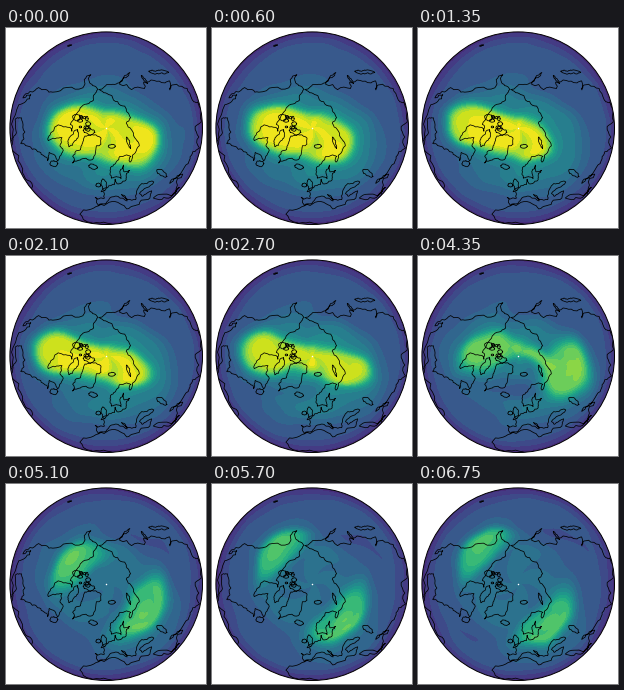
Recreate the animation shown at these times as a matplotlib script. Size 200 by 200 pixels, loop 6.9 s.

```python
import numpy as np
import matplotlib.pyplot as plt
from matplotlib.animation import FuncAnimation
from matplotlib.patches import Circle

FRAMES, STEP = 46, 150
SIZE, MID, RADIUS = 200, 100.2, 96.3
LEVELS = np.linspace(0, 1, 21)

fig = plt.figure(figsize=(2, 2), dpi=100, facecolor="white")
ax = fig.add_axes([0, 0, 1, 1])
ax.set(xlim=(0, SIZE), ylim=(SIZE, 0))
ax.axis("off")
globe = Circle((MID, MID), RADIUS, fill=False, ec="black", lw=0.7, zorder=5)
ax.add_patch(globe)
ax.plot(99.8, 99.8, "o", color="white", ms=1.1, mew=0, zorder=4)

rng = np.random.default_rng(12)


# ---- coastlines ----

def project(lon, lat):
    """Orthographic view from above the north pole."""
    r = RADIUS * np.cos(np.radians(lat))
    return MID + r * np.sin(np.radians(lon)), MID + r * np.cos(np.radians(lon))


def outline(x, y, rough=0.12):
    """Draw a line roughened by midpoint displacement."""
    p = np.column_stack([x, y])
    for _ in range(3):
        step = np.diff(p, axis=0)
        side = np.column_stack([-step[:, 1], step[:, 0]])
        mids = p[:-1] + step / 2 + side * rng.normal(0, rough, (len(step), 1))
        p = np.insert(p, np.arange(1, len(p)), mids, axis=0)
    ax.plot(*p.T, color="black", lw=0.55, zorder=3, clip_path=globe)


def coast(*points):
    outline(*project(*np.array(points, float).T))


def island(lon, lat, a, b, tilt=0):
    x, y = project(lon, lat)
    s, w = np.linspace(0, 2 * np.pi, 9), np.radians(tilt)
    u, v = a * np.cos(s), b * np.sin(s)
    outline(x + u * np.cos(w) - v * np.sin(w), y + u * np.sin(w) + v * np.cos(w))


# Arctic Eurasia with the Baltic
coast((8.5, 54), (10, 57.5), (11, 54), (20, 54.5), (24, 59), (29, 60), (22, 61),
      (25, 65), (17.5, 62), (16.5, 57), (11, 59), (6, 58.5), (5, 62), (14, 67.5),
      (25.5, 71), (41, 67), (35, 64.5), (44, 67), (67, 69), (72, 72), (104, 77.6),
      (113, 74), (140, 72.6), (170, 70), (190, 66))
# Pacific and southern Asia
coast((190, 66), (178, 63), (163, 59.5), (157, 51), (163, 61.5), (136, 55),
      (141, 52), (128, 40), (127, 35), (121, 39.5), (122, 30.5), (109, 20),
      (106, 9), (98, 8), (91, 22.5), (78, 8), (70, 22), (57, 26), (49, 29),
      (59, 22), (44, 12), (34, 29), (43, 11), (51, 12), (44, 2))
# Western Europe and Africa
coast((8.5, 54), (-4.6, 48.5), (-1.5, 43.4), (-9, 43.2), (-6, 36.4), (0, 39),
      (9, 44.4), (16, 38.2), (13, 45), (22.5, 36.6), (24, 40.5), (31, 46.5),
      (41.5, 41.8), (27, 40.5), (28, 36.7), (36, 36.5), (32, 31.2), (20, 31),
      (10.5, 37), (-5.8, 35.8), (-17, 21), (-8, 4.5), (9, 4))
# North America
coast((-168, 65.7), (-156, 71.3), (-128, 70), (-96, 68), (-85, 69), (-94, 60),
      (-82, 53), (-78, 52), (-78, 62), (-69, 59), (-65, 60), (-56, 52.5),
      (-67, 50), (-61, 46), (-70.5, 42.5), (-76, 36), (-80, 25.5), (-84, 30),
      (-97, 27.5), (-95, 18.5), (-87, 21), (-83, 10), (-62, 10), (-51, 4))
coast((-168, 65.7), (-160, 60), (-164, 54.7), (-150, 61), (-124, 48), (-121, 35),
      (-110, 23), (-114, 31), (-105, 20), (-80, 7.5))
# Greenland
coast((-44, 60), (-53, 67), (-55, 72), (-70, 76.5), (-64, 81), (-32, 83.5),
      (-18, 80), (-23, 70), (-39, 65.5), (-44, 60))

for spec in [(-2.5, 54, 6, 2.5, 80), (-8, 53.4, 2.5, 2), (-19, 65, 4.5, 2.4, 15),
             (17, 78.7, 3.5, 2), (57, 74, 6, 1.3, 72), (-80, 79.5, 6, 3, 10),
             (-73, 69, 9.5, 3.5, -63), (-110, 71, 4, 3.3), (-56, 49, 4, 3),
             (137, 37, 10, 2, 3), (142, 50, 5, 1, 53), (51, 42, 6, 2.5, 33),
             (-156, 20, 2, 0.5, -15)]:
    island(*spec)
for _ in range(9):
    island(rng.uniform(-122, -88), rng.uniform(72, 79), *rng.uniform(0.9, 2.6, 2))


# ---- vortex ----

grid = np.linspace(2, 198, 170)
X, Y = np.meshgrid(grid, grid)
R = np.hypot(X - MID, Y - MID)
TH = np.arctan2(X - MID, Y - MID)

STREAKS = [(rng.integers(1, 5), rng.uniform(.08, .34), rng.uniform(0, 6.3))
           for _ in range(9)]
EDDIES = [(*rng.normal(0, .11, 2), rng.uniform(0, 6.3)) for _ in range(12)]

# Path of the two lobe centres: west x, y, east x, y
TIMES = np.array([0, 9, 22, 29, 38, 45])
PATH = np.array([(70, 102, 126, 114), (58, 98, 109, 113), (59, 97, 146, 114),
                 (70, 95, 148, 114), (66, 68, 130, 134), (63, 66, 130, 138)], float)
SLOPE = np.gradient(PATH, TIMES, axis=0)


def ease(t, start, end):
    s = np.clip((t - start) / (end - start), 0, 1)
    return s * s * (3 - 2 * s)


def mix(a, b, s):
    return a + (b - a) * s


def centres(t):
    """Cubic Hermite glide along the path."""
    i = min(np.searchsorted(TIMES, t, "right") - 1, len(TIMES) - 2)
    h = TIMES[i + 1] - TIMES[i]
    s = (t - TIMES[i]) / h
    k = s * s * (3 - 2 * s)
    p = (mix(PATH[i], PATH[i + 1], k) + h * s * (1 - s) ** 2 * SLOPE[i]
         - h * s * s * (1 - s) * SLOPE[i + 1])
    return p[:2], p[2:]


def eddies(x, y, t, shift):
    return sum(np.sin(a * x + b * y + p * shift + .09 * t)
               for a, b, p in EDDIES) / 3.5


def edge(d, soft):
    """1 inside, 0 outside, for signed distance d."""
    return 1 / (1 + np.exp(np.clip(d / soft, -30, 30)))


def oval(x, y, c, a, b, tilt, bend=0):
    """Signed distance to a bent ellipse, and the offset across it."""
    w = np.radians(tilt)
    u = np.cos(w) * (x - c[0]) + np.sin(w) * (y - c[1])
    v = np.cos(w) * (y - c[1]) - np.sin(w) * (x - c[0]) - bend * u ** 2
    return (np.hypot(u / a, v / b) - 1) * np.sqrt(a * b), v / b


def strand(x, y, p, q):
    """Distance to the segment from p to q."""
    dx, dy = q - p
    s = np.clip(((x - p[0]) * dx + (y - p[1]) * dy) / (dx * dx + dy * dy), 0, 1)
    return np.hypot(x - p[0] - s * dx, y - p[1] - s * dy)


def field(t):
    spin = TH - .022 * t
    px, py = R * np.sin(spin), R * np.cos(spin)
    wx, wy = eddies(px, py, t, 1), eddies(py, px, t, 2.3)
    x, y = X + 1.5 * wx, Y + 1.5 * wy
    streak = sum(np.sin(m * spin + k * (R + 3 * wx) + p)
                 for m, k, p in STREAKS) / 3
    limb = np.clip((R / RADIUS - .84) / .16, 0, 1)
    value = .265 - .14 * limb ** 1.6 + .035 * streak * R / (R + 25)

    west, east = centres(t)
    split = ease(t, 12, 30)
    late = ease(t, 20, 38)
    axis = np.degrees(np.arctan2(*(east - west)[::-1]))

    # surrounding halo, and the weak air drawn in below the western lobe
    d, _ = oval(x, y, (102, 110), mix(66, 76, split), 50, axis)
    value += mix(.17, .09, late) * edge(d, 6)
    d, _ = oval(x, y, west + (18, 36), 38, 9, 5)
    value -= .13 * np.exp(-((t - 25) / 7) ** 2) * edge(d, 4)

    # lobes turn from lying along their axis to lying across it
    d, v = oval(x, y, west, mix(26, 31, late), mix(20, 14, late),
                axis - 90 * ease(t, 23, 38), .008 * late)
    fill = edge(d, 3.2) * (1 - .3 * late * np.clip(.5 + v / 2, 0, 1))
    gap = 1 - fill
    swell = np.exp(-((t - 28) / 6) ** 2)
    d, v = oval(x, y, east, mix(22, 36, late), 14 + 2 * late + 7 * swell,
                axis - 90 * ease(t, 18, 30), -.006 * late)
    rings = .06 * late * np.cos(d / 2.2)
    gap *= 1 - edge(d, 3.2) * (1 - rings - .3 * late * np.clip(.5 - v / 2, 0, 1))

    # the bridge thins until it breaks
    width = 24 * max(0, 1 - t / 34) ** .8
    d = strand(x, y, west + split * np.array([10, -12]),
               east - split * np.array([10, 3])) - width
    gap *= 1 - edge(d, 3) * min(1, width / 5)

    top = mix(.95, .73, ease(t, 10, 42)) + .035 * streak + .02 * wy
    return np.clip(value + (top - value) * (1 - gap), .01, .99)


shown = []


def draw(i):
    while shown:
        shown.pop().remove()
    fill = ax.contourf(X, Y, field(i), levels=LEVELS, cmap="viridis", zorder=1)
    fill.set_clip_path(globe)
    shown.append(fill)
    return shown


anim = FuncAnimation(fig, draw, frames=FRAMES, init_func=lambda: [],
                     interval=STEP, repeat=True, repeat_delay=0)
plt.show()
```
